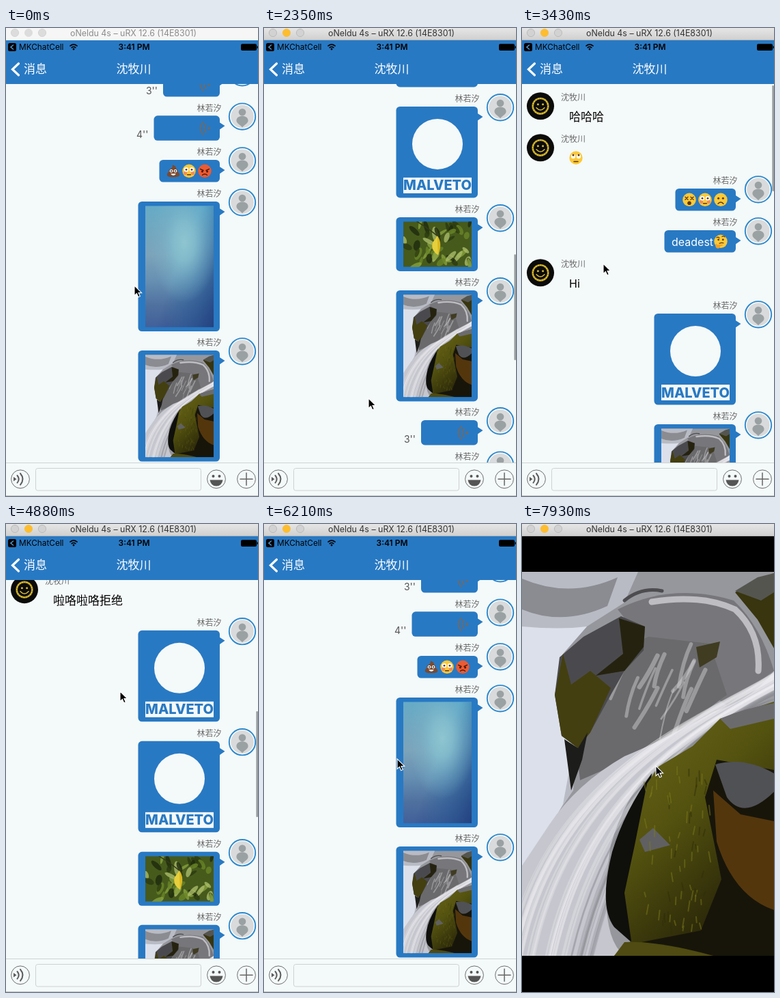
Write an HTML page that moves like this. It is 369 by 685 pixels and loops after 7.99 s.

```html
<!DOCTYPE html>
<html lang="zh-CN">
<head>
<meta charset="utf-8">
<title>Chat</title>
<style>
html, body { margin: 0; width: 100%; height: 100%; overflow: hidden; background: #f4f9f9; }
svg { display: block; }
#stage { position: absolute; left: 0; top: 0; }
text { font-family: Inter, "Noto Sans CJK SC", "Noto Sans CJK", "Noto Sans", sans-serif; white-space: pre; }
</style>
</head>
<body>
<svg id="stage" width="369" height="685" viewBox="0 0 369 685"></svg>
<script>
const LOOP = 7990, BLUE = '#2879c3', PAPER = '#f4f9f9', GREY = '#6a6a6a';
const PEER = '沈牧川', ME = '林若汐', BRAND = 'MALVETO';
const DEVICE = 'oNeldu 4s – uRX 12.6 (14E8301)';

let seed = 11;
const rnd = (a = 0, b = 1) => {
  seed = (seed * 16807) % 2147483647;
  return a + (b - a) * seed / 2147483647;
};
const many = (n, f) => Array.from({ length: n }, (_, i) => f(i)).join('');
const shape = (d, fill) => `<path d="${d}" fill="${fill}"/>`;
const line = (d, stroke, w, extra = '') =>
  `<path d="${d}" fill="none" stroke="${stroke}" stroke-width="${w}" stroke-linecap="round" ${extra}/>`;
const dot = (x, y, r, fill, extra = '') => `<circle cx="${x}" cy="${y}" r="${r}" fill="${fill}" ${extra}/>`;
const box = (x, y, w, h, fill, r = 0, extra = '') =>
  `<rect x="${x}" y="${y}" width="${w}" height="${h}" rx="${r}" fill="${fill}" ${extra}/>`;
const label = (x, y, size, fill, s, extra = '') =>
  `<text x="${x}" y="${y}" font-size="${size}" fill="${fill}" ${extra}>${s}</text>`;
const MID = 'text-anchor="middle"', END = 'text-anchor="end"';
const photo = (id, x, y, w, h, extra = '') =>
  `<use href="#${id}" x="${x}" y="${y}" width="${w}" height="${h}" ${extra}/>`;
const stops = list => list.map(([o, c, a = 1]) =>
  `<stop offset="${o}" stop-color="${c}" stop-opacity="${a}"/>`).join('');
const symbol = (id, view, body) =>
  `<symbol id="${id}" viewBox="${view}" preserveAspectRatio="none">${body}</symbol>`;

// Pictures
const sky = symbol('sky', '0 0 369 667',
  box(0, 0, 369, 667, 'url(#down)') + box(0, 0, 369, 667, 'url(#side)') +
  box(0, 0, 369, 667, 'url(#corner)') + box(0, 0, 369, 667, 'url(#glow)'));

const falls = symbol('falls', '0 70 369 562',
  box(0, 70, 369, 562, '#96979d') +
  shape('M0 70H170L150 115 95 150 60 190 50 260 80 330 75 390 0 500Z', '#b9bbc4') +
  shape('M0 150Q55 155 95 150L60 190 50 260 75 330 60 410 0 520Z', '#dce0ea') +
  shape('M0 80Q70 110 140 78L125 120Q60 150 0 125Z', '#8b8c92') +
  shape('M140 125Q220 85 310 112 350 150 369 215L300 265 200 200Z', '#77777b') +
  shape('M130 190L185 165 275 175 300 250 200 325 85 375 80 330Z', '#6a6a6c') +
  line('M190 114Q262 102 312 125 350 160 346 215', '#d6d6da', 9, 'opacity=".75"') +
  line('M150 112Q175 92 205 98', '#4d4d50', 5) +
  many(16, () => {
    const x = rnd(140, 275), y = rnd(175, 245);
    return line(`M${x} ${y}q-12 25 -${rnd(14, 34)} ${rnd(45, 75)}`, '#d4d4da', rnd(2, 7), 'opacity=".45"');
  }) +
  shape('M255 180L290 172 285 195 260 210Z', '#3f3c22') +
  shape('M48 250L55 195 90 165 145 135 180 150 178 185 150 215 130 250 100 305 82 328 58 310Z', '#4a4a4e') +
  shape('M48 250L60 190 72 235 100 215 130 240 100 305 82 328 58 310Z', '#433f10') +
  shape('M142 138L180 150 178 180 150 215 108 222 148 190Z', '#25230f') +
  shape('M62 315L82 328 96 305 88 345 72 390Z', '#1c1c1a') +
  shape('M312 100L369 72V182L345 140Z', '#38350f') +
  shape('M312 98L345 78 369 72V100L350 112Z', '#55554f') +
  shape('M369 215Q340 255 280 275 200 320 150 340 80 380 40 440L0 500V632H150Q110 600 130 470 150 400 190 360 260 310 290 285L369 255Z', '#c6c6ce') +
  many(30, () => {
    const k = rnd();
    return line(`M369 ${218 + k * 35}C280 ${275 + k * 20} ${20 + k * 140} ${360 + k * 30} ${k * 125 - 25} 645`,
      k > .75 ? '#85858c' : '#f2f2f6', rnd(1, 7), 'opacity=".3"');
  }) +
  shape('M190 365Q150 420 132 480 112 560 135 590L160 612 178 500Z', '#0f0f0c') +
  shape('M369 260L290 285 250 325 200 355 183 380 165 470 150 540 160 610 135 632H369Z', 'url(#moss)') +
  shape('M290 285Q325 270 369 262V285L305 300Z', '#6b6b6e') +
  shape('M285 345L369 360V632H280L175 612 262 595 292 520 268 400Z', '#17150a') +
  shape('M280 390L320 425 369 435V565Q310 545 285 465Z', '#54360d') +
  shape('M283 352Q325 340 369 365V392Q325 435 300 400Z', '#505155') +
  shape('M172 462L192 445 217 470 180 480Z', '#606063') +
  many(70, i => {
    const x = rnd(178, 275), y = rnd(355, 590);
    return line(`M${x} ${y}l${rnd(-3, 3)} ${rnd(6, 16)}`, i % 3 ? '#7c7a1c' : '#302e08', 2, 'opacity=".5"');
  }) +
  shape('M135 632L150 612Q200 610 280 632Z', '#4f4b12'));

const leaves = symbol('leaves', '0 0 100 66.5',
  box(0, 0, 100, 66.5, '#465a1c') +
  many(46, i => {
    const x = rnd(0, 100), y = rnd(0, 66);
    const c = ['#88a23c', '#2b3a10', '#6a8527', '#a9bb68', '#1f2a0d'][i % 5];
    return `<ellipse cx="${x}" cy="${y}" rx="${rnd(2, 5)}" ry="${rnd(5, 11)}" fill="${c}" opacity=".8" transform="rotate(${rnd(-70, 70)} ${x} ${y})"/>`;
  }) +
  line('M20 0Q40 12 53 24', '#333a18', 1.5) +
  shape('M50 21Q58 32 51 49 40 42 43 31Z', '#d9b820') +
  shape('M50 21Q50 36 51 49 40 42 43 31Z', '#e6cf3c'));

// Emoji, drawn round 0,0
const face = (c, body) => dot(0, 0, 9.7, c) + body;
const DARK = '#5d3510', YEL = '#fcc937';
const eyes = (x, y, r, c) => dot(-x, y, r, c) + dot(x, y, r, c);
const emoji = {
  poo: shape('M-1-9Q5-7 4-3 8-2 6 1 10 3 9 7 7 9 0 9-7 9-9 7-10 3-6 1-8-2-4-3-1-5-1-9Z', '#7a4a30') +
    eyes(3, 0, 2.3, '#fff') + eyes(3, 0, 1.1, '#222') + shape('M-4 4H4Q0 9-4 4Z', '#fff'),
  flush: face(YEL, eyes(5.5, 3, 2.6, '#f58a5a') + eyes(4, -2, 3.3, '#fff') + eyes(4, -2, 1.4, DARK) + line('M-2.5 5.5H2.5', DARK, 1.4)),
  angry: face('#ee5a31', line('M-6.5-3L-2-.8M6.5-3L2-.8', '#4b1a0c', 1.5) + eyes(3.6, .6, 1.5, '#4b1a0c') + line('M-3.5 6Q0 3 3.5 6', '#4b1a0c', 1.4)),
  roll: face(YEL, eyes(4, -2, 3.2, '#fff') + eyes(4, -4, 1.5, DARK) + line('M-3 5.5H3', DARK, 1.4)),
  dizzy: face(YEL, line('M-6-4l4 4m0-4l-4 4M2-4l4 4m0-4l-4 4', DARK, 1.3) + dot(0, 5, 2.8, DARK)),
  sad: face(YEL, eyes(3.4, -2, 1.5, DARK) + line('M-4 6Q0 1.5 4 6', DARK, 1.4)),
  think: face(YEL, eyes(3.3, -2.5, 1.4, DARK) + line('M-6-5.5Q-4-7-2-5M2-7Q4-8.5 6-6.5M-2 3Q1 1.5 4 2.5', DARK, 1.2) +
    shape('M-8 5Q-6 2-5 5L3 4.5Q4 6-1 7 0 10-4 10.5-8 10-8 5Z', '#f0a126'))
};
const emo = (k, x, y) => `<g transform="translate(${x} ${y})">${emoji[k]}</g>`;

// Chat rows; y is the middle of the name line
const myIcon = y => `<g transform="translate(346 ${y + 12.3})">` +
  dot(0, 0, 19.2, '#f8fbfb', 'stroke="#2b88cd" stroke-width="1.9"') + dot(0, 0, 16.8, '#d9dadb') +
  dot(0, -6.3, 5.3, '#9aa1a3') + shape('M0-.8C6-.8 9 3 8.5 6.5 8 10.5 3 12 0 16-3 12-8 10.5-8.5 6.5-9 3-6-.8 0-.8Z', '#9aa1a3') + '</g>';
const peerIcon = y => `<g transform="translate(27 ${y + 12.3})">` + dot(0, 0, 20, '#0b0b0a') +
  dot(0, 0, 11.3, 'none', 'stroke="#b79a1e" stroke-width="2.6"') +
  dot(0, 0, 11.3, 'none', 'stroke="#e8cf4a" stroke-width="1.4" stroke-dasharray="1.5 2"') +
  eyes(3.6, -2.5, 1.5, '#d9bd32') + line('M-6 2.5Q0 9 6 2.5', '#d9bd32', 1.5) + '</g>';
const mine = (y, x, h, body) => myIcon(y) + label(315.5, y + 4.4, 12, GREY, ME, END) +
  box(x, y + 11, 313 - x, h, BLUE, 5.5) + shape(`M312 ${y + 20.5}L320.5 ${y + 26} 312 ${y + 32}Z`, BLUE) + body;
const peer = (y, body) => peerIcon(y) + label(57, y + 4.4, 12, GREY, PEER) + body;
const said = (y, s, size = 17) => peer(y, label(69, y + 34, size, '#000', s));
const trio = (y, ...k) => mine(y, 224.5, 32.5, k.map((e, i) => emo(e, 245 + 23 * i, y + 27.3)).join(''));
const pic = (y, id, h) => mine(y, 193.5, h + 12.5, photo(id, 204, y + 17.3, 100, h));
const brand = y => mine(y, 193.5, 133.5, dot(254, y + 66, 37, PAPER) + box(204, y + 115, 100, 23, PAPER) +
  label(254, y + 133.5, 20, BLUE, BRAND, MID + ' font-weight="800"'));
const voice = (y, x, s) => mine(y, x, 36.5,
  label(x - 8, y + 44, 14, '#555', s + "''", END) +
  `<g transform="translate(298 ${y + 29.5})">` + shape('M1-3V3L-4 0Z', '#6b6b6b') +
  line('M-5-6Q-11 0-5 6', '#6b6b6b', 2) + line('M-9-9Q-18 0-9 9', '#6b6b6b', 2) + '</g>');

const rows = said(102, '哈哈哈') +
  peer(163, emo('roll', 79, 190)) +
  trio(224, 'dizzy', 'flush', 'sad') +
  mine(285, 208.5, 32.5, label(219, 318.5, 16, '#fff', 'deadest') + emo('think', 291, 312.3)) +
  said(346, 'Hi', 16) + brand(407) + pic(569, 'falls', 150) + said(759, '啦咯啦咯拒绝') +
  brand(820) + brand(982) + pic(1144, 'leaves', 66.5) + pic(1251, 'falls', 150) +
  voice(1441, 230, 3) + voice(1505.3, 216.5, 4) + trio(1570, 'poo', 'flush', 'angry') +
  pic(1631, 'sky', 177.6) + pic(1849, 'falls', 150);

// Fixed parts
const nav = box(0, 18, 369, 64, BLUE) + line('M18.5 52L9.5 60.5 18.5 69', '#fff', 3.2) +
  label(26, 66, 17, '#fff', '消息') + label(187, 66, 17, '#fff', PEER, MID);
const status = box(3, 22, 12, 12, '#000', 2.5) + line('M10.5 25L7 28 10.5 31', '#4f93cc', 1.6) +
  label(19, 32.2, 11.8, '#000', 'MKChatCell') +
  line('M94 26.2Q99 22 104 26.2M96.2 28.6Q99 26.4 101.8 28.6', '#000', 1.7) + dot(99, 31, 1.4, '#000') +
  label(187.5, 32.2, 12, '#000', '3:41 PM', MID + ' font-weight="600"') +
  box(344, 23.3, 23, 9.6, '#000', 2) + box(367.6, 26.5, 1.4, 3.2, '#000');
const ring = x => dot(x, 660.3, 13.4, PAPER, 'stroke="#6e6e6e" stroke-width="1"');
const tools = box(0, 636, 369, 49, PAPER) + box(0, 636, 369, 1, '#cfd3d3') +
  box(43.5, 644.5, 242, 32.5, PAPER, 3, 'stroke="#cdd1d1"') +
  ring(21) + shape('M11 657V663.5L15.5 660.3Z', '#5c5c5c') +
  line('M16.5 655Q21 660.3 16.5 665.6', '#5c5c5c', 2) + line('M21 652Q28 660.3 21 668.6', '#5c5c5c', 2) +
  ring(308) + dot(303.5, 656, 2, '#555') + dot(312.5, 656, 2, '#555') +
  shape('M298.5 661.5H317.5Q316 670.5 308 670.5 300 670.5 298.5 661.5Z', '#555') +
  ring(352) + line('M343 660.3H361M352 651.3V669.3', '#666', 1.5) + box(0, 684, 369, 1, '#c3c7c7');
const lights = (a, b, edge) => [a, b, a].map((c, i) =>
  dot(13 + 20 * i, 7, 5.6, c, `stroke="${i === 1 ? b : edge}" stroke-width=".8"`)).join('');
const bar = (fill, ink, knobs) => box(0, 0, 369, 18, fill) + knobs + label(186.5, 12, 12.4, ink, DEVICE, MID);

const stage = document.getElementById('stage');
stage.innerHTML = `<defs>
<linearGradient id="chrome" x2="0" y2="1">${stops([[0, '#e6e6e6'], [1, '#cfcfcf']])}</linearGradient>
<linearGradient id="down" x2="0" y2="1">${stops([[0, '#66abc6'], [.4, '#7ca3ba'], [.62, '#668fb2'], [.82, '#4f719f'], [1, '#42609a']])}</linearGradient>
<linearGradient id="side">${stops([[.3, '#4ba6d0', 0], [1, '#4ba6d0', .6]])}</linearGradient>
<linearGradient id="corner" x1=".35" y1=".55" x2="1" y2="1">${stops([[.1, '#23407f', 0], [1, '#23407f', 1]])}</linearGradient>
<radialGradient id="glow" cx=".57" cy=".3" r=".5">${stops([[0, '#8fc5d0'], [.3, '#86bfce', .85], [.65, '#7cb4c8', .4], [1, '#7cb4c8', 0]])}</radialGradient>
<linearGradient id="moss" x2=".6" y2="1">${stops([[0, '#6b691a'], [.5, '#54520f'], [1, '#221f08']])}</linearGradient>
${sky}${falls}${leaves}</defs>
${box(0, 0, 369, 685, PAPER)}
<g id="list">${rows}</g>
${box(366.3, 0, 2.7, 155, '#9aa0a2', 1.3, 'id="thumb"')}
${nav}${tools}
<g id="viewer">${box(0, 18, 369, 667, '#000', 0, 'id="shade"')}
<g id="pages">${photo('sky', 0, 18, 369, 667, 'id="big"')}${photo('falls', 379, 70, 369, 562)}</g></g>
<g id="status">${status}</g>
<g id="idle">${bar('#f6f6f6', '#8b8b8b', lights('#dcdcdc', '#dcdcdc', '#cfcfcf'))}</g>
<g id="active">${bar('url(#chrome)', '#333', lights('#d2d2d2', '#fdbd2f', '#b4b4b4'))}${box(0, 17, 369, 1, '#b3b3b3')}</g>
<path id="mouse" d="M0 0V14.6L3.4 11.5 5.7 16.8 8.3 15.7 6 10.6H10.6Z" fill="#000" stroke="#fff" stroke-width="1.1"/>`;
const $ = Object.fromEntries([...stage.querySelectorAll('[id]')].map(e => [e.id, e]));

// Motion: [time, value(s), easing into this point]
const ease = {
  line: u => u,
  out: u => 1 - (1 - u) ** 2,
  soft: u => u * u * (3 - 2 * u)
};
const scroll = [[2080, 1388], [2350, 880], [3260, 0, 'out'], [3780, 0], [4150, 300], [4650, 590, 'out'],
  [4880, 674], [5100, 930], [5570, 1334, 'out'], [5850, 1388, 'out']];
const thumbFade = [[2080, 0], [2140, 1], [5950, 1], [6150, 0]];
const mouseX = [[480, 188], [700, 232], [900, 276], [1080, 180], [1230, 92], [1600, 130], [1850, 160], [2050, 152],
  [2350, 153], [2800, 140], [3430, 119], [3720, 130], [3800, 150], [4150, 160], [4600, 165], [4880, 167],
  [5150, 175], [5570, 187], [6150, 190], [6480, 246], [6880, 246], [7150, 318], [7420, 140], [7820, 321], [7930, 196]];
const mouseY = [[480, 377], [700, 445], [900, 330], [1080, 209], [1230, 270], [1600, 150], [1850, 190], [2050, 230],
  [2350, 542], [2800, 500], [3430, 345], [3720, 420], [3800, 480], [4150, 240], [4600, 420], [4880, 245],
  [5150, 200], [5570, 331], [6150, 340], [6480, 383], [6880, 383], [7150, 345], [7420, 350], [7820, 337], [7930, 354]];
const zoom = [[6500, 0], [6800, 1, 'soft']];
const swipe = [[7170, 0], [7420, .48], [7720, 1, 'out']];
const statusFade = [[6880, 1], [6980, 0]];

function at(keys, t, kind = 'line') {
  if (t <= keys[0][0]) return keys[0][1];
  const i = keys.findIndex(k => k[0] > t);
  if (i < 0) return keys[keys.length - 1][1];
  const [t0, a] = keys[i - 1], [t1, b, e = kind] = keys[i];
  return a + (b - a) * ease[e]((t - t0) / (t1 - t0));
}
const put = (el, attrs) => { for (const k in attrs) el.setAttribute(k, attrs[k]); };
const move = (el, x, y) => put(el, { transform: `translate(${x} ${y})` });

function draw(t) {
  const y = at(scroll, t), z = at(zoom, t);
  move($.list, 0, -y);
  put($.thumb, { y: 84 + y * .2815, opacity: at(thumbFade, t) });
  put($.viewer, { visibility: t >= 6500 ? 'visible' : 'hidden' });
  put($.shade, { opacity: z });
  put($.big, { x: 204 * (1 - z), y: 260.3 + (18 - 260.3) * z, width: 100 + 269 * z, height: 177.6 + 489.4 * z });
  move($.pages, z < 1 ? 0 : -379 * at(swipe, t), 0);
  // The next page waits off stage until the zoom has ended
  put($.status, { opacity: at(statusFade, t) });
  put($.active, { visibility: t >= 1700 ? 'visible' : 'hidden' });
  move($.mouse, at(mouseX, t, 'soft'), at(mouseY, t, 'soft'));
}
const start = performance.now();
function tick() {
  draw((performance.now() - start) % LOOP);
  requestAnimationFrame(tick);
}
draw(0);
requestAnimationFrame(tick);
</script>
</body>
</html>
```
